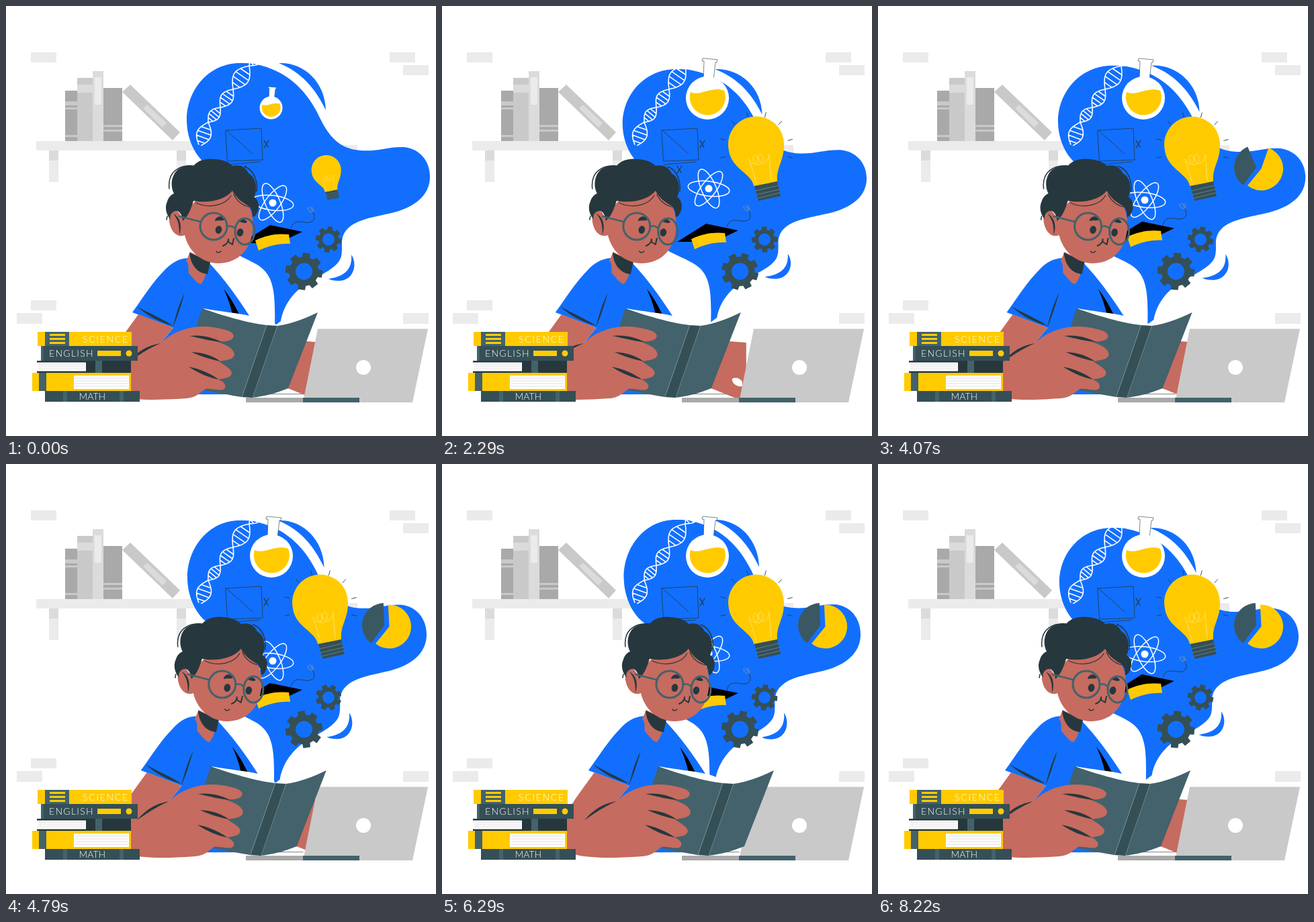
An HTML page for the animation above (8290 ms loop, 640 by 640 pixels).

```html
<!DOCTYPE html>
<html lang="en">
<head>
<meta charset="utf-8">
<title>Study time</title>
<style>
  html, body { margin: 0; width: 100%; height: 100%; overflow: hidden; background: #fff }
  svg { display: block; width: 100vw; height: 100vh }
  text { font-family: Lato, "Open Sans", sans-serif; font-size: 14px; fill: #fff }
  .line { fill: none; stroke-linecap: round; stroke-linejoin: round }
  .blue { fill: #126ffe } .skin { fill: #c66b5f } .hair { fill: #26383e }
  .teal { fill: #43626c } .deep { fill: #354f56 } .gold { fill: #ffcb00 }
  .g1 { fill: #ebebeb } .g2 { fill: #dbdbdb } .g3 { fill: #c9c9c9 } .g4 { fill: #a9a9a9 }
</style>
</head>
<body>
<svg viewBox="0 0 640 640">
  <!-- wall -->
  <path class="g1" d="M37 69h38v15h-38zM571 69h38v15h-38zM591 88h38v15h-38zM37 438h38v15h-38zM16 457h38v16h-38zM591 457h38v16h-38zM486 207h37v15h-37z"/>

  <!-- shelf -->
  <path class="g1" d="M45 201h252v14H45zM64 215h14v47H64zM254 215h14v47h-14z"/>
  <path class="g2" d="M64 215h14v15H64zM254 215h14v15h-14z"/>
  <path class="g4" d="M88 126h18v75H88zM145 122h28v79h-28z"/>
  <path class="g3" d="M88 142h18v6H88zM88 151h18v3H88zM88 192h18v3H88zM106 107h23v94h-23zM145 177h28v3h-28zM145 184h28v3h-28zM173 128L185 117L259 188L248 200Z"/>
  <path class="g2" d="M106 117h23v12h-23zM129 97h16v104h-16zM204 152L210 147L239 174L233 181Z"/>
  <path class="g1" d="M132 106h10v41h-10z"/>

  <!-- thought cloud -->
  <g id="cloud" class="blue">
    <path d="M269 172C268 125 302 85 348 85C358 85 366 85 373 87C415 96 444 121 464 160C479 192 494 212 527 215C555 217 568 209 592 210C615 212 631 230 631 254C631 282 608 299 578 307C550 314 521 317 507 333C496 346 502 358 499 372C496 389 468 400 446 414C428 426 413 445 409 469L400 476C401 425 399 399 372 384C358 376 345 371 330 362L318 245C291 240 270 208 269 172Z"/>
    <path d="M406 85C442 83 475 112 476 155C461 124 441 99 406 85Z"/>
    <path d="M514 370C524 385 517 409 495 409C488 409 483 408 480 406C500 403 516 395 514 370Z"/>
  </g>

  <path id="dna" class="line" stroke="#fff" stroke-width="1.6"/>
  <g class="line" stroke="#26383e" stroke-width=".8">
    <path d="M327 185L380 182L382 229L330 231ZM328 185L367 220M330 236L378 232"/>
    <path stroke-width="1.3" d="M384 200l6 10m1-10l-7 11M350 238l6 10m1-10l-7 11"/>
  </g>

  <g id="atom" class="line" stroke="#fff" stroke-width="1.5">
    <g transform="translate(397 293)">
      <ellipse rx="31" ry="11" transform="rotate(7)"/>
      <ellipse rx="31" ry="11" transform="rotate(67)"/>
      <ellipse rx="31" ry="11" transform="rotate(127)"/>
      <circle r="5.500" fill="#fff" stroke="none"/>
    </g>
  </g>

  <g id="cap">
    <path d="M350 353L393 326L441 336L418 347L375 353Z"/>
    <path class="gold" d="M371 349C386 341 405 338 421 340L423 354C408 353 390 357 376 364Z"/>
    <g class="line" stroke="#26383e" stroke-width=".9">
      <path d="M424 331C429 314 441 324 452 322C461 320 460 312 456 306"/>
      <path stroke="#8a9ba0" d="M456 307C450 306 449 303 449 300M457 306L452 299M458 305L455 299"/>
    </g>
  </g>

  <path id="gearA" class="deep" fill-rule="evenodd"/>
  <path id="gearB" class="deep" fill-rule="evenodd"/>

  <g id="flask">
    <path fill="#fff" stroke="#26383e" stroke-width=".6" d="M388 78L410 80L409 84L407 84L404 110L389 110L390 82L387 82Z"/>
    <circle cx="395" cy="137" r="32" fill="#fff"/>
    <path class="gold" d="M370 128C384 135 402 119 420 126A26.500 26.500 0 1 1 370 128Z"/>
  </g>

  <g id="bulb">
    <path class="gold" d="M427 215A41.500 41.500 0 1 1 509 207C509 232 497 240 499 262L464 268C461 249 431 243 427 215Z"/>
    <path class="line" stroke="#ffe27a" stroke-width=".9" d="M457 228L468 264M487 221L490 259M457 228C462 238 471 238 470 227C468 218 461 223 464 231C468 240 478 237 478 226C476 216 468 222 472 230C476 238 486 234 487 221"/>
    <path class="deep" d="M465 268L499 261L504 283L471 290Z"/>
    <path class="line" stroke="#6a858d" stroke-width=".9" d="M467 275L501 267M468 281L502 273M470 286L503 278"/>
    <path id="rays" class="line" stroke="#26383e" stroke-width=".9"/>
  </g>

  <path id="pieA" class="gold"/>
  <path id="pieB" fill="#3a5862"/>

  <path class="line" stroke="#59686d" stroke-width=".8" d="M330 577.500H442"/>

  <g id="farArm">
    <path class="skin" d="M435 498L472 501V584L455 583C440 578 430 572 415 568Z"/>
    <path fill="#fff" d="M451 555C456 552 463 554 466 559V566C459 568 450 561 451 555Z"/>
  </g>

  <!-- laptop -->
  <path class="g3" d="M464 480.500H628L605 590H442Z"/>
  <circle cx="532" cy="538" r="11" fill="#fff"/>
  <path class="g4" d="M357 583h85v7h-85z"/>
  <path class="teal" d="M442 583h84v7h-84z"/>

  <g id="boy">
    <!-- shirt -->
    <path class="blue" d="M275 375C261 375 250 379 238 391C217 412 205 433 188 456L249 479L229 503V578H352L362 461C345 434 324 405 302 382Z"/>
    <path d="M324 421C334 434 341 446 347 459H337C334 445 330 434 324 421Z"/>
    <path class="hair" d="M266 427C260 447 256 461 248 479C253 460 257 444 266 427ZM195 447C214 458 232 465 249 476C230 471 211 462 195 447Z"/>
    <!-- neck -->
    <path class="skin" d="M274 366L268 380C273 383 271 391 272 398C277 402 283 413 290 414C297 406 299 394 304 381Z"/>
    <path class="hair" d="M273 367C275 386 285 398 300 399L304 381Z"/>
    <!-- book -->
    <path fill="#fff" d="M293 450C320 455 345 457 362 461C378 464 386 470 389 476L400 472L404 477L350 485Z"/>
    <path class="teal" d="M292 450C320 460 360 472 388 475L351 582C320 577 290 570 253 565ZM404 476C425 473 446 465 464 456L420 569C400 577 385 581 365 583Z"/>
    <path class="deep" d="M388 475L404 476L367 583L351 582Z"/>
    <path class="line" stroke="#8ba0a6" stroke-width=".6" d="M388 475L351 582M404 476L367 583"/>
    <!-- near arm -->
    <path class="skin" d="M197 459L176 488C156 514 145 544 147 566C150 585 200 589 268 584C283 583 288 576 297 570C307 569 315 573 323 571C330 568 326 559 316 556C325 554 335 554 336 546C335 539 325 535 317 529C328 527 340 526 340 518C338 508 326 504 313 499C325 500 338 499 339 491C337 483 326 482 314 479C282 472 248 483 229 503L249 479Z"/>
    <path class="hair" d="M273 491C292 489 306 493 321 500C305 499 292 495 273 491ZM276 515C293 516 308 520 319 529C305 526 291 522 276 515ZM272 537C288 540 303 546 317 556C302 553 287 547 272 537ZM182 530C196 515 207 506 230 502C211 510 199 519 182 530Z"/>
    <!-- head -->
    <path class="skin" d="M263 316C272 300 290 270 337 270C352 284 362 296 365 306C369 320 368 335 365 346C358 369 340 383 316 383C290 382 272 365 266 341C257 345 246 339 243 321C242 306 250 301 257 307Z"/>
    <path class="hair" d="M245 318C238 310 236 300 240 291C242 284 246 281 250 279C243 266 247 247 260 241C267 237 274 237 279 238C286 229 299 226 312 228C324 229 333 233 337 238C348 235 357 240 361 249C368 253 372 260 372 270C372 277 371 281 369 284C377 289 378 301 373 309C371 313 369 314 367 314C367 305 364 299 360 297C351 292 342 285 337 275C326 288 305 294 279 290C276 300 272 312 263 320C262 310 258 304 252 305C246 307 243 312 245 318Z"/>
    <path class="line" stroke="#26383e" stroke-width="1.500" d="M243 272C240 247 258 236 279 238M355 239C369 244 375 260 373 276M240 313L239 318"/>
    <path class="line" stroke="#26383e" stroke-width="1.200" d="M283 293C305 303 328 295 335 282M339 280C343 290 352 297 362 299"/>
    <path class="hair" d="M249 309C258 314 263 325 258 341C258 327 257 319 249 309Z"/>
    <g class="hair">
      <ellipse cx="316.500" cy="333" rx="4.800" ry="6" transform="rotate(12 316 333)"/>
      <ellipse cx="348.500" cy="337" rx="4.800" ry="6" transform="rotate(12 348 337)"/>
      <path d="M311 320C312 312 322 311 326 317C323 321 317 318 311 320ZM346 321C349 315 356 316 359 322C355 325 350 321 346 321Z"/>
    </g>
    <path class="line" stroke="#26383e" stroke-width="2" d="M323 357C328 355 331 352 331 347L331 351L337 355L339 346"/>
    <path class="line" stroke="#26383e" stroke-width="1.500" d="M313 365C315 368 318 367 320 365"/>
    <g class="line" stroke="#43626c" stroke-width="3">
      <circle cx="309" cy="328" r="20"/>
      <ellipse cx="355.500" cy="335.500" rx="14.500" ry="19.500"/>
      <path stroke-width="2.500" d="M329 328C333 327 338 328 341 331M258 313L289 321"/>
    </g>
  </g>

  <!-- book stack -->
  <path class="gold" d="M47 485h140v21H47zM39 546h147v27H39z"/>
  <path class="deep" d="M52 506h144v22H52zM58 573h141v16H58z"/>
  <path class="hair" d="M46 528h140v18H46z"/>
  <path fill="#fff" d="M46 530.500h73v13H46zM101 550h82v20h-82z"/>
  <path class="teal" d="M58 485h36v21H58zM133 528h10v18h-10zM49 546h11v27H49zM52 506h4v22h-4zM85 573h6v16h-6zM169 573h6v16h-6z"/>
  <path class="gold" d="M65 488h23v3H65zM65 494h23v3H65zM65 500h23v3H65zM136 513h35v8h-35z"/>
  <circle class="gold" cx="183" cy="517" r="4.500"/>
  <path class="line" stroke="#c9c9c9" stroke-width=".6" d="M48 534H117M48 537H117M48 540H117M103 554H181M103 558H181M103 562H181M103 566H181"/>
  <text x="114" y="500.500" font-weight="300" letter-spacing="1.700">SCIENCE</text>
  <text x="64" y="521.500" font-weight="300" letter-spacing="1.300">ENGLISH</text>
  <text x="108.500" y="585.500" font-weight="300">MATH</text>
</svg>
<script>
const LOOP = 8290, TAU = Math.PI * 2, RAD = Math.PI / 180;
const el = id => document.getElementById(id);
const set = (id, name, value) => el(id).setAttribute(name, value);
const move = (id, value) => set(id, 'transform', value);
const clamp = v => Math.min(1, Math.max(0, v));
const polar = (x, y, r, a) => `${(x + r * Math.cos(a)).toFixed(2)} ${(y + r * Math.sin(a)).toFixed(2)}`;

// keys: [time, value, time, value, ...]
function track(keys, t) {
  let i = 0;
  while (i < keys.length - 4 && t > keys[i + 2]) i += 2;
  const [t0, a, t1, b] = keys.slice(i, i + 4);
  return a + (b - a) * clamp((t - t0) / (t1 - t0));
}

const boyX = [0, 0, LOOP / 4, -22, LOOP * .75, 31, LOOP, 0];
const cloudX = [0, 0, 860, -5, 1290, -10, 1720, -5, 2290, 1, 3290, 5, 3900, 6, 4360, 4, 4790, -5,
  5220, -8, 6290, -8, 6860, -1, 7700, 0, 8220, -5];
const cloudY = [0, 0, 1290, -2, 2290, 9, 2650, 10, 3290, 6, 4290, 3, 4790, -1, 6290, -2, 6860, -1, 7790, 9, 8220, 10];
const capY = [0, 0, 1100, 6, 1290, 6, 2290, -2, 3290, -11, 4790, 0, 5600, 6, 6290, 5, 8220, -13];
const atomY = [0, 0, 1290, -13, 2200, -22, 3290, -12, 4500, 0, 4790, 0, 6290, -11, 7250, -21, 8220, -10];

function dnaPath() {
  const knots = [[288, 209], [301, 173], [319, 151], [338, 124], [362, 89], [382, 70]];
  const strands = ['', ''];
  let rungs = '';
  for (let k = 0; k < 5; k++) {
    const [x, y] = knots[k], dx = knots[k + 1][0] - x, dy = knots[k + 1][1] - y;
    const n = 16, sign = k % 2 ? -1 : 1;
    for (let i = k ? 0 : 1; i <= n; i++) {
      const u = i / n, w = .28 * Math.sin(Math.PI * u) * sign;
      const at = s => `${(x + dx * u - dy * w * s).toFixed(1)} ${(y + dy * u + dx * w * s).toFixed(1)}`;
      [1, -1].forEach((s, j) => strands[j] += (strands[j] ? 'L' : 'M') + at(s));
      if (i > 2 && i < 15 && i % 3 == 0) rungs += `M${at(1)}L${at(-1)}`;
    }
  }
  return strands.join('') + rungs;
}

function gearPath(x, y, outer, body, hole) {
  let d = '';
  for (let i = 0; i < 8; i++)
    for (const [r, a] of [[body, -15], [outer, -11], [outer, 11], [body, 15]])
      d += (d ? 'L' : 'M') + polar(x, y, r, (i * 45 + a) * RAD);
  return `${d}ZM${x - hole} ${y}a${hole} ${hole} 0 1 0 ${2 * hole} 0a${hole} ${hole} 0 1 0 ${-2 * hole} 0Z`;
}

function sector(x, y, r, from, sweep) {
  if (!sweep) return '';
  return `M${x} ${y}L${polar(x, y, r, from * RAD)}A${r} ${r} 0 ${+(Math.abs(sweep) > 180)} ${+(sweep > 0)} ` +
    `${polar(x, y, r, (from + sweep) * RAD)}Z`;
}

set('dna', 'd', dnaPath());
set('gearA', 'd', gearPath(443.5, 395, 28, 22, 12.5));
set('gearB', 'd', gearPath(480, 347.5, 19.5, 15, 9));
set('rays', 'd', [-165, -132, -105, -75, -47, -14, 15, 165].map(a =>
  `M${polar(468, 212, 48, a * RAD)}L${polar(468, 212, 55, a * RAD)}`).join(''));

const about = (x, y, sx, sy = sx) => `translate(${x} ${y}) scale(${sx} ${sy}) translate(${-x} ${-y})`;

function draw(t) {
  const slide = `translate(${track(boyX, t)} 0)`;
  move('boy', slide);
  move('farArm', slide);
  move('cloud', about(329, 328, 1 + track(cloudX, t) / 302, 1 - track(cloudY, t) / 243));
  move('cap', `translate(0 ${track(capY, t)})`);
  move('atom', `translate(0 ${track(atomY, t)})`);

  // springy pop-in
  const pop = 1 - .47 * Math.exp(-t / 430) * Math.cos(TAU * t / 645);
  move('flask', about(394, 168, pop));
  move('bulb', about(487, 287, pop));
  set('rays', 'opacity', t > 140 ? 1 : 0);

  const turn = 360 * t / LOOP;
  move('gearA', `rotate(${8 + turn} 443.5 395)`);
  move('gearB', `rotate(${8 - turn} 480 347.5)`);

  set('pieA', 'd', sector(570.5, 242, 32.5, 129, -222 * clamp((t - 2740) / 1480)));
  set('pieB', 'd', sector(563, 240, 33, 126, 142 * clamp((t - 3200) / 1020)));
}

const start = performance.now();
function frame() {
  draw((performance.now() - start) % LOOP);
  requestAnimationFrame(frame);
}
frame();
</script>
</body>
</html>
```
